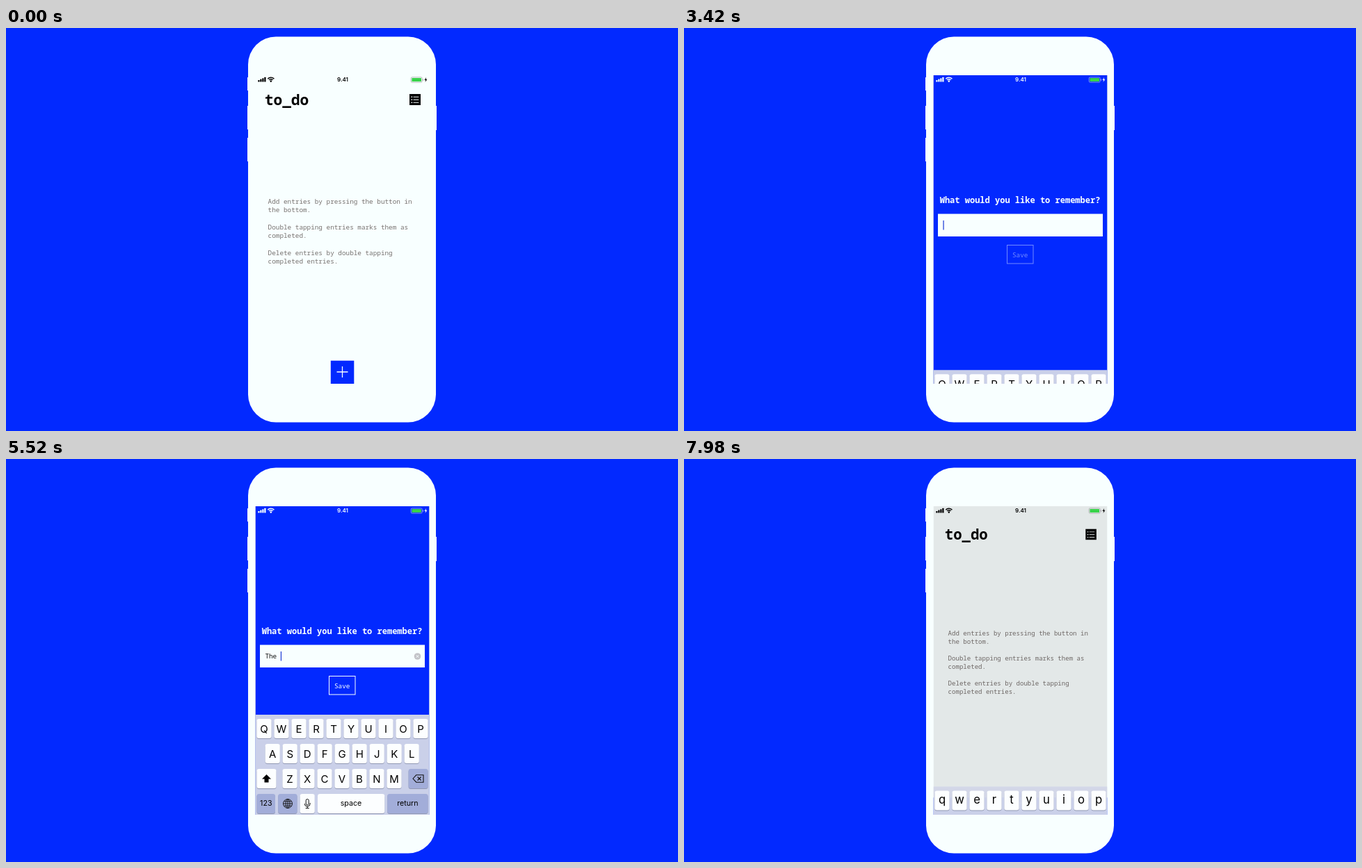
Animation of 966 by 580 pixels, one loop 8000 ms. Source, as an HTML page with a canvas:

```html
<!DOCTYPE html>
<html lang="en">
<head>
<meta charset="utf-8">
<title>to_do</title>
<style>
  html, body { margin: 0; width: 100%; height: 100%; overflow: hidden; background: #0229ff; }
  canvas { display: block; }
</style>
</head>
<body>
<canvas id="stage" width="966" height="580"></canvas>
<script>
const ctx = document.getElementById('stage').getContext('2d');
const LOOP = 8000, STEP = 30;
const BLUE = '#0229ff', WHITE = '#f8ffff';
const MONO = '"Noto Sans Mono", "DejaVu Sans Mono", monospace';
const SANS = 'Inter, Roboto, sans-serif';
const SCREEN = { x: 358.5, y: 68, w: 250, h: 444 };
const HINTS = [
  'Add entries by pressing the button in', 'the bottom.', '',
  'Double tapping entries marks them as', 'completed.', '',
  'Delete entries by double tapping', 'completed entries.'
];
const ENTRY = 'The Alarm';
const STROKES = [4560, 4770, 4980, 5190, 5700, 5970, 6240, 6570, 6840];
const OPEN = 2505, FOCUS = 3420, CLOSE = 7725;

const clamp = v => Math.max(0, Math.min(1, v));
const span = (t, start, length) => clamp((t - start) / length);
const smooth = u => u * u * (3 - 2 * u);

// The standard CSS "ease" curve.
function ease(u) {
  const bezier = (s, a, b) => 3 * s * (1 - s) ** 2 * a + 3 * s * s * (1 - s) * b + s ** 3;
  let lo = 0, hi = 1;
  for (let i = 0; i < 20; i++) {
    const mid = (lo + hi) / 2;
    if (bezier(mid, 0.25, 0.25) < u) lo = mid; else hi = mid;
  }
  return bezier(lo, 0.1, 1);
}

function box(x, y, w, h, color, r = 0) {
  ctx.fillStyle = color;
  ctx.beginPath();
  ctx.roundRect(x, y, w, h, r);
  ctx.fill();
}

function line(points, color, width = 1, close = false) {
  ctx.strokeStyle = color;
  ctx.lineWidth = width;
  ctx.beginPath();
  points.forEach(([x, y]) => ctx.lineTo(x, y));
  if (close) ctx.closePath();
  ctx.stroke();
}

function shape(points, color) {
  ctx.fillStyle = color;
  ctx.beginPath();
  points.forEach(([x, y]) => ctx.lineTo(x, y));
  ctx.fill();
}

function text(str, x, y, font, color, align = 'left') {
  ctx.font = font;
  ctx.fillStyle = color;
  ctx.textAlign = align;
  ctx.fillText(str, x, y);
}

function circle(x, y, r, color) {
  ctx.fillStyle = color;
  ctx.beginPath();
  ctx.arc(x, y, r, 0, 7);
  ctx.fill();
}

function drawPhone() {
  box(0, 0, 966, 580, BLUE);
  box(347, 71, 2, 19, WHITE);
  box(347, 112, 2, 34, WHITE);
  box(347, 158, 2, 34, WHITE);
  box(617, 112, 2, 35, WHITE);
  box(348, 12.5, 270, 555, WHITE, 40);
}

function drawHome(depth) {
  ctx.save();
  ctx.translate(483.5, 298);
  ctx.scale(1 - 0.1 * depth, 1 - 0.1 * depth);
  ctx.translate(-483.5, -298);
  text('to_do', 371.7, 110.5, `bold 21.2px ${MONO}`, '#000');
  box(580, 95, 16, 16, '#000');
  for (const y of [99.3, 103.3, 107.3]) {
    box(582.6, y - 0.7, 1.5, 1.4, WHITE);
    box(585.5, y - 0.5, 7.8, 1, WHITE);
  }
  HINTS.forEach((hint, i) => text(hint, 376.6, 253.2 + 12.25 * i, `9.33px ${MONO}`, '#77716f'));
  ctx.restore();
  box(SCREEN.x, SCREEN.y, SCREEN.w, SCREEN.h, `rgba(15,0,5,${0.314 * depth})`);
}

function drawSheet(shown, typed, caret) {
  const offset = SCREEN.h * (1 - shown);
  box(SCREEN.x, SCREEN.y + offset, SCREEN.w, SCREEN.h, BLUE);
  ctx.save();
  ctx.beginPath();
  ctx.rect(SCREEN.x, SCREEN.y + offset, SCREEN.w, SCREEN.h);
  ctx.clip();
  ctx.translate(0, offset * 0.762);
  text('What would you like to remember?', 367.7, 251.8, `bold 12.03px ${MONO}`, WHITE);
  box(365, 267.5, 237, 32.5, WHITE);
  text(typed, 372.4, 287.4, `9.33px ${MONO}`, '#111');
  if (typed) {
    circle(591.5, 284, 4.8, '#c3c3c8');
    line([[589.7, 282.2], [593.3, 285.8]], WHITE);
    line([[593.3, 282.2], [589.7, 285.8]], WHITE);
  }
  ctx.globalAlpha = caret;
  box(372.4 + 5.6 * typed.length, 277, 1.3, 13.5, '#2a45d8');
  ctx.globalAlpha = typed ? 1 : 0.45;
  ctx.strokeStyle = WHITE;
  ctx.lineWidth = 1;
  ctx.strokeRect(464.5, 312.5, 37.5, 26.5);
  text('Save', 483.2, 329.8, `9.33px ${MONO}`, WHITE, 'center');
  ctx.restore();
}

function drawAddButton(shown) {
  ctx.save();
  ctx.globalAlpha = clamp(1 - shown * 1.15);
  box(466.8, 478.8, 33.5, 33.2, BLUE);
  ctx.globalAlpha = 1 - shown ** 2;
  ctx.translate(483.5, 495);
  ctx.rotate(shown * Math.PI / 2);
  if (shown < 0.97) {
    line([[-8, 0], [8, 0]], WHITE, 1.3);
    line([[0, -8], [0, 8]], WHITE, 1.3);
  }
  ctx.restore();
}

function key(x, y, w, color = '#fcfeff') {
  box(x, y + 1, w, 28, '#9299b4', 3.3);
  box(x, y, w, 28, color, 3.3);
}

function letterRow(letters, firstX, y, upper) {
  [...letters].forEach((c, i) => {
    const x = firstX + 25 * i;
    key(x - 10.6, y - 14, 21.2);
    if (upper) text(c, x, y + 5.5, `15px ${SANS}`, '#000', 'center');
    else text(c.toLowerCase(), x, y + 4.4, `16.7px ${SANS}`, '#000', 'center');
  });
}

function drawGlobe(x, y) {
  ctx.strokeStyle = '#111';
  ctx.lineWidth = 0.9;
  ctx.beginPath();
  ctx.arc(x, y, 6.5, 0, 7);
  ctx.moveTo(x + 3, y);
  ctx.ellipse(x, y, 3, 6.5, 0, 0, 7);
  ctx.moveTo(x, y - 6.5);
  ctx.lineTo(x, y + 6.5);
  for (const [dy, half] of [[-3.2, 5.6], [0, 6.5], [3.2, 5.6]]) {
    ctx.moveTo(x - half, y + dy);
    ctx.lineTo(x + half, y + dy);
  }
  ctx.stroke();
}

function drawMic(x, y) {
  ctx.strokeStyle = '#111';
  ctx.lineWidth = 1;
  ctx.beginPath();
  ctx.roundRect(x - 2, y - 6.5, 4, 8.5, 2);
  ctx.moveTo(x + 4, y - 1);
  ctx.arc(x, y, 4, 0, Math.PI);
  ctx.moveTo(x, y + 4);
  ctx.lineTo(x, y + 6.5);
  ctx.moveTo(x - 2.5, y + 6.5);
  ctx.lineTo(x + 2.5, y + 6.5);
  ctx.stroke();
}

function drawKeyboard(raised, upper) {
  const GREY = '#a2add9';
  ctx.save();
  ctx.translate(0, 144 * (1 - raised));
  box(SCREEN.x, 368, SCREEN.w, 145, 'rgba(211,215,233,.96)');
  letterRow('QWERTYUIOP', 371, 388, upper);
  letterRow('ASDFGHJKL', 383.2, 424, upper);
  letterRow('ZXCVBNM', 408, 460, upper);

  key(360.5, 446, 28, upper ? '#fcfeff' : GREY);
  const arrow = [[374.5, 454], [381, 460.5], [377.5, 460.5], [377.5, 465.5],
    [371.5, 465.5], [371.5, 460.5], [368, 460.5]];
  if (upper) shape(arrow, '#000');
  else line(arrow, '#111', 1.1, true);

  key(578.6, 446, 28, GREY);
  line([[585, 460], [589.7, 454.8], [600, 454.8], [600, 465.2], [589.7, 465.2]], '#111', 1.1, true);
  line([[591.6, 457.5], [596.6, 462.5]], '#111', 1.1);
  line([[596.6, 457.5], [591.6, 462.5]], '#111', 1.1);

  const label = (str, x) => text(str, x, 499.3, `10.7px ${SANS}`, '#000', 'center');
  key(360.5, 482, 26.5, GREY);
  key(391.2, 482, 27.3, GREY);
  key(422.6, 482, 21.2);
  key(448, 482, 96.3);
  key(548.2, 482, 58.4, GREY);
  label('123', 373.8);
  label('space', 496);
  label('return', 577.4);
  drawGlobe(405, 496);
  drawMic(433.2, 496);
  ctx.restore();
}

function drawStatus(color, light) {
  for (let i = 0; i < 4; i++) box(362.3 + 3 * i, 75 - 1.4 * i, 2.2, 2.4 + 1.4 * i, color, 0.5);
  ctx.strokeStyle = color;
  ctx.lineWidth = 1.4;
  for (const r of [3.7, 6.2]) {
    ctx.beginPath();
    ctx.arc(380.8, 77.4, r, -Math.PI * 0.76, -Math.PI * 0.24);
    ctx.stroke();
  }
  circle(380.8, 76.6, 1.3, color);
  text('9.41', 484, 77.4, `600 8px ${SANS}`, color, 'center');
  ctx.strokeStyle = light ? '#9aa6ff' : '#a4a8a8';
  ctx.lineWidth = 0.8;
  ctx.beginPath();
  ctx.roundRect(582.2, 70.8, 16, 7.4, 1.6);
  ctx.stroke();
  box(583.4, 72, 13.6, 5, '#38d34a', 0.6);
  box(599, 73.3, 1, 2.4, ctx.strokeStyle, 0.5);
  shape([[604, 71], [601.5, 75], [603.2, 75], [602.6, 78], [605.4, 73.8], [603.6, 73.8]], color);
}

// Solid, then fades out, stays off and fades in again, once a second.
function caretAlpha(t) {
  if (t < FOCUS || t > CLOSE) return 0;
  const last = STROKES.filter(s => s <= t).pop() || FOCUS;
  const phase = (t - last) % 1000;
  return phase < 900 ? 1 - span(phase, 550, 100) : span(phase, 900, 100);
}

function draw(t) {
  const closing = smooth(span(t, CLOSE, 392));
  const depth = ease(span(t, OPEN, 400)) * (1 - closing);
  const shown = ease(span(t, OPEN, 630)) * (1 - ease(span(t, CLOSE, 360)));
  const raised = t < FOCUS ? 0 : ease(span(t, FOCUS - 50, 400)) * (1 - closing);
  const count = STROKES.filter(s => s <= t).length;
  const light = t >= 2580 && t < 7830;

  drawPhone();
  ctx.save();
  ctx.beginPath();
  ctx.rect(SCREEN.x, SCREEN.y, SCREEN.w, SCREEN.h);
  ctx.clip();
  drawHome(depth);
  if (shown > 0) drawSheet(shown, ENTRY.slice(0, count), caretAlpha(t));
  drawAddButton(shown);
  if (raised > 0) drawKeyboard(raised, count === 0 || count === 4);
  drawStatus(light ? WHITE : '#000', light);
  ctx.restore();
}

const start = performance.now();
function tick() {
  const t = (performance.now() - start) % LOOP;
  draw(t - t % STEP);
  requestAnimationFrame(tick);
}
tick();
</script>
</body>
</html>
```
